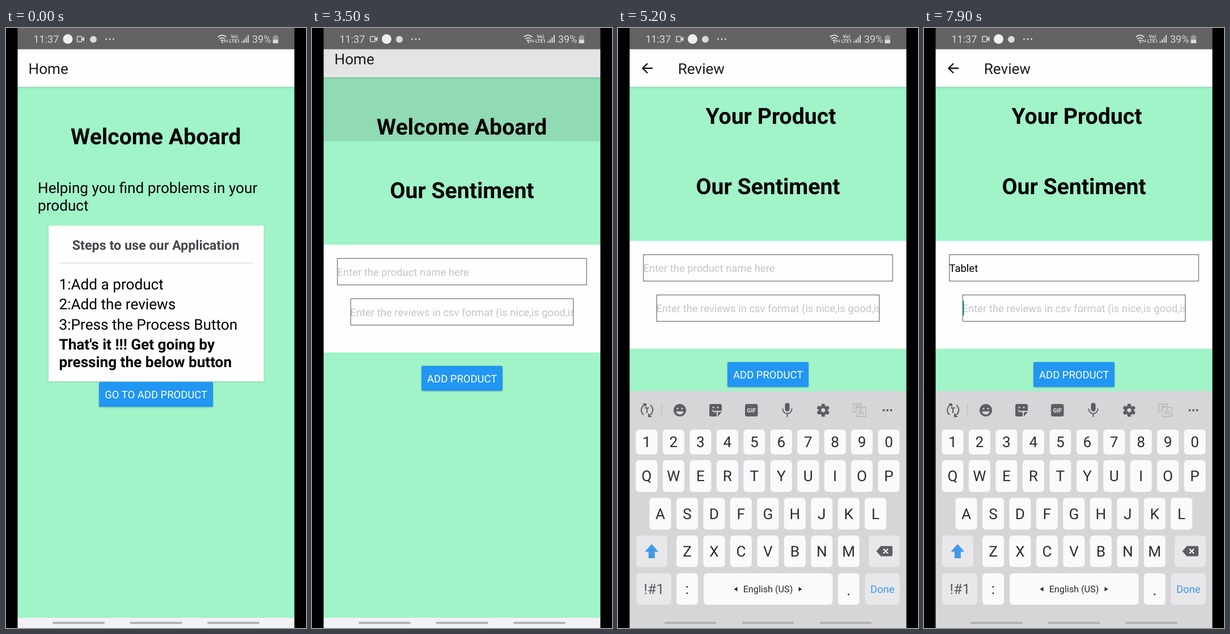
An HTML page that plays this animation: 529x1058 px, repeating every 8 s.

```html
<!DOCTYPE html>
<html lang="en">
<head>
<meta charset="utf-8">
<title>Review app</title>
<style>
  html, body { margin: 0; width: 100%; height: 100%; overflow: hidden; background: #000; }
  svg { display: block; width: 529px; height: 1058px; }
  text { font: 26.15px Roboto, sans-serif; text-rendering: geometricPrecision; white-space: pre; }
  .b { font-weight: 700; }
  .h { font-size: 39.2px; font-weight: 700; }
  .s { font-size: 18.45px; }
  .m { text-anchor: middle; }
  .hint { fill: #c5c5c7; }
  .btn { fill: #2196f3; filter: drop-shadow(0 1.5px 1.5px rgba(0,0,0,.25)); }
  .field { fill: none; stroke: #77777b; stroke-width: 1.3; }
  .key { fill: #faf9fc; }
  .fn { fill: #e8e7ea; }
  .ic { fill: #5e5d61; }
  .ln { fill: none; stroke: #5e5d61; stroke-width: 2; }
  #keyboard text { fill: #2c2c2f; }
</style>
</head>
<body>
<svg viewBox="0 0 529 1058">
  <defs>
    <linearGradient id="shade" x2="0" y2="1">
      <stop stop-opacity=".12"/><stop offset="1" stop-opacity="0"/>
    </linearGradient>
    <clipPath id="screen"><rect x="20" y="37" width="489" height="1003"/></clipPath>
    <clipPath id="reveal"><rect id="revealBox" x="20" y="37" width="489" height="1003"/></clipPath>
    <clipPath id="inner"><rect x="68" y="470" width="393" height="48"/></clipPath>
    <g id="page">
      <rect x="20" y="37" width="489" height="1050" fill="#a0f4c8"/>
      <rect x="20" y="37" width="489" height="66.700" fill="#fefefe"/>
      <rect x="20" y="103.700" width="489" height="4" fill="url(#shade)"/>
    </g>
  </defs>

  <g clip-path="url(#screen)">
    <g id="home">
      <use href="#page"/>
      <text x="39.500" y="81" fill="#1c1c1e">Home</text>
      <text class="h m" x="264.200" y="205">Welcome Aboard</text>
      <text x="56" y="291">Helping you find problems in your</text>
      <text x="56" y="322">product</text>
      <rect x="75" y="348.500" width="379.500" height="274.500" fill="#fefefe" stroke="#dbe5e2" style="filter:drop-shadow(0 1px 1px rgba(0,0,0,.15))"/>
      <text class="b m" x="264.200" y="391" fill="#43484d" style="font-size:23.300px">Steps to use our Application</text>
      <path d="M93.500 414.500H436" stroke="#d9dce0" stroke-width="1.3"/>
      <text x="93.500" y="461">1:Add a product</text>
      <text x="93.500" y="496.300">2:Add the reviews</text>
      <text x="93.500" y="531.600">3:Press the Process Button</text>
      <text class="b" x="93.500" y="567">That's it !!! Get going by</text>
      <text class="b" x="93.500" y="597.700">pressing the below button</text>
      <rect class="btn" x="164" y="624" width="201" height="44" rx="2.6"/>
      <text class="s m" x="264.700" y="653" fill="#fff">GO TO ADD PRODUCT</text>
    </g>
    <rect id="dim" x="20" y="37" width="489" height="1003"/>
  </g>

  <g clip-path="url(#reveal)">
    <g id="review">
      <use href="#page"/>
      <path d="M61 71H44M52 62.500L43.500 71L52 79.500" fill="none" stroke="#161618" stroke-width="2.4"/>
      <text x="105.700" y="81" fill="#1c1c1e">Review</text>
      <text class="h m" x="269.500" y="169">Your Product</text>
      <text class="h m" x="264.500" y="293">Our Sentiment</text>
      <rect x="20" y="375.500" width="489" height="190" fill="#fefefe"/>
      <text id="name" class="s" x="44.500" y="430"></text>
      <path id="underline" stroke="#000" stroke-width="1.2"/>
      <rect class="field" x="44.700" y="399.700" width="439.600" height="46.600"/>
      <g clip-path="url(#inner)"><text class="s hint" x="67.500" y="501">Enter the reviews in csv format (is nice,is good,is bad)</text></g>
      <rect class="field" x="68.300" y="470.700" width="392.400" height="46.600"/>
      <rect id="cursor" width="2.400" height="26" fill="#0a8f7c"/>
      <rect class="btn" x="193" y="589" width="143" height="44" rx="2.6"/>
      <text class="s m" x="264.700" y="618" fill="#fff">ADD PRODUCT</text>
    </g>
  </g>

  <rect x="20" y="1040" width="489" height="18" fill="#f2f1f3"/>

  <g id="keyboard">
    <rect x="20" y="640.500" width="489" height="420" fill="#d6d5d8"/>
    <!-- toolbar -->
    <path class="ln" d="M45 682a10.500 10.500 0 0 1 3-18M57 665a10.500 10.500 0 0 1-2 18M44 663h5v5M59 685h-5v-5"/>
    <text class="b m" x="51" y="679" style="font-size:14px;fill:#5e5d61">T</text>
    <path d="M77 662v24" stroke="#bcbbbe" stroke-width="1.3"/>
    <circle class="ic" cx="109" cy="674" r="11"/>
    <g fill="#d6d5d8"><circle cx="105" cy="671" r="1.600"/><circle cx="113" cy="671" r="1.600"/><path d="M102.500 676h13a6.500 5.500 0 0 1-13 0z"/></g>
    <path class="ic" d="M164 663h16q3 0 3 3v9h-6q-3 0-3 3v7h-10q-3 0-3-3v-16q0-3 3-3zM176 685v-5q0-3 3-3h4z"/>
    <g fill="#d6d5d8"><circle cx="168" cy="669" r="1.500"/><circle cx="176" cy="669" r="1.500"/></g>
    <path d="M166 674q5 5 9 1" fill="none" stroke="#d6d5d8" stroke-width="2"/>
    <rect class="ic" x="224" y="663" width="22.500" height="22" rx="3.500"/>
    <text class="b m" x="235.300" y="678" style="font-size:10.500px;fill:#e4e3e6">GIF</text>
    <rect class="ic" x="294.500" y="661" width="8" height="15" rx="4"/>
    <path class="ln" d="M290.500 671v1a8 8 0 0 0 16 0v-1M298.500 680v6"/>
    <g id="gear" class="ic"></g>
    <g fill="none" stroke="#bdbcbf" stroke-width="1.800">
      <path d="M419 677h-5v-14h15v5M417 667h9M421.500 665v2q0 4-4 6M420 681v4h17v-16h-17v9"/>
      <path d="M424 682l4.500-11l4.500 11M425.500 678.500h6"/>
    </g>
    <g class="ic"><circle cx="468.500" cy="674" r="2"/><circle cx="475" cy="674" r="2"/><circle cx="481.500" cy="674" r="2"/></g>
    <!-- keys -->
    <g id="keys"></g>
    <rect class="fn" x="32" y="895" width="55" height="55.500" rx="6"/>
    <path id="shift" d="M59.300 910l12 13.500h-6.500v11.500h-11v-11.500h-6.500z"/>
    <rect class="fn" x="442" y="895" width="55" height="55.500" rx="6"/>
    <path class="ic" d="M455.500 922.500l8-9h18q2.500 0 2.500 2.500v13q0 2.500-2.500 2.500h-18z"/>
    <path d="M468 918.500l8 8m0-8l-8 8" stroke="#fff" stroke-width="2"/>
    <rect class="fn" x="32" y="961.500" width="62" height="55.500" rx="6"/>
    <text class="m" x="63.500" y="998" style="font-size:25px;fill:#59585c">!#1</text>
    <rect class="key" x="151" y="961.500" width="227.500" height="55.500" rx="6"/>
    <text class="m" x="264.500" y="995" style="font-size:16.200px">English (US)</text>
    <path d="M210.500 985.500v8l-6-4zM318.500 985.500v8l6-4z" fill="#2c2c2f"/>
    <rect class="fn" x="435.500" y="961.500" width="61.500" height="55.500" rx="6"/>
    <text class="s m" x="466.300" y="996" style="fill:#3d9ae8">Done</text>
  </g>

  <g fill="#b4b3b6">
    <rect x="82" y="1047" width="92" height="4" rx="2"/><rect x="218.500" y="1047" width="92" height="4" rx="2"/><rect x="355" y="1047" width="92" height="4" rx="2"/>
  </g>

  <!-- status bar -->
  <rect width="529" height="37.500" fill="#656266"/>
  <g fill="#d9d8da">
    <text x="48.500" y="26" style="font-size:18px">11:37</text>
    <g id="camera"><rect x="-5.500" y="14.800" width="8" height="9.400" rx="1" fill="none" stroke="#d9d8da" stroke-width="1.600"/><path d="M3 18.500l4-3.500v9l-4-3.500z"/></g>
    <circle id="dot" cy="19.500" r="8.500" fill="#efeff0"/>
    <circle cx="154" cy="20" r="6"/>
    <circle cx="176.500" cy="19.500" r="1.500"/><circle cx="183" cy="19.500" r="1.500"/><circle cx="189.500" cy="19.500" r="1.500"/>
    <path d="M373.500 16q7.500-6.500 15 0M376 19.500q5-4.500 10 0M378.500 22.500q2.500-2 5 0" fill="none" stroke="#d9d8da" stroke-width="1.700"/>
    <path d="M381 23.500l2 2l-2 1zM386 26v-5m-1.500 2l1.500-2l1.500 2M390 20v5m-1.500-2l1.500 2l1.500-2" stroke="#d9d8da"/>
    <text class="b m" x="403" y="18" style="font-size:8.500px">Vo)</text>
    <text class="b m" x="403" y="26" style="font-size:8.500px">LTE1</text>
    <path d="M415.500 23h2v3h-2zM419 20h2v6h-2zM422.500 16.500h2v9.500h-2zM426 12.500h2v13.500h-2z"/>
    <text x="434" y="26" style="font-size:18px">39%</text>
    <path d="M473 12.500h4.500v1.500h2.500v6.500h-9.500v-6.500h2.500z" fill="#98969a"/>
    <path d="M470.500 20.500h9.500v6.500h-9.500z"/>
  </g>
  <path d="M0 0h20.500v1058h-20.500zM508.500 0h20.500v1058h-20.500z"/>
</svg>

<script>
const $ = id => document.getElementById(id);
const set = (id, attrs) => { for (const k in attrs) $(id).setAttribute(k, attrs[k]); };
const clamp = x => Math.min(1, Math.max(0, x));
const LOOP = 8000, STEP = 100, TOP = 37, HEIGHT = 1003;

// Keyboard rows: characters, first centre, top, height, baseline
const PITCH = 47.45;
const rows = [
  ["1234567890", 50.5, 708, 44, 739],
  ["qwertyuiop", 50.5, 762, 56, 799],
  ["asdfghjkl", 74.5, 828.5, 56, 865.5],
  ["zxcvbnm", 122, 895, 55.5, 932],
  [":", 122, 961.5, 55.5, 998],
  [".", 406.7, 961.5, 55.5, 1000]
];
$("keys").innerHTML = rows.map(([chars, x0, y, h, base]) =>
  [...chars].map((c, i) => {
    const x = x0 + i * PITCH;
    return `<rect class="key" x="${x - 19}" y="${y}" width="38" height="${h}" rx="6"/>
      <text class="m" x="${x}" y="${base}">${c}</text>`;
  }).join("")).join("");
const letters = [...$("keys").querySelectorAll("text")].filter(e => /[a-z]/.test(e.textContent));

$("gear").innerHTML = [0, 60, 120].map(a =>
  `<rect x="358.800" y="662.500" width="6" height="23" rx="1.500" transform="rotate(${a} 361.800 674)"/>`
).join("") + '<circle cx="361.800" cy="674" r="8.600"/><circle cx="361.800" cy="674" r="3.600" fill="#d6d5d8"/>';

// Cubic bezier easing, solved by bisection
function bezier(x1, y1, x2, y2) {
  const at = (s, a, b) => 3 * (1 - s) ** 2 * s * a + 3 * (1 - s) * s * s * b + s ** 3;
  return x => {
    let lo = 0, hi = 1;
    for (let i = 0; i < 30; i++) {
      const mid = (lo + hi) / 2;
      if (at(mid, x1, x2) < x) lo = mid; else hi = mid;
    }
    return at(lo, y1, y2);
  };
}
const revealEase = bezier(0.20833, 0.82, 0.25, 1);
const typed = [5600, 6000, 6200, 6400, 6600, 6800];

function render(t) {
  const swap = clamp((t - 200) / 300);
  set("dot", { cx: 109 + 22.5 * swap });
  set("camera", { transform: `translate(${131 - 22.5 * swap})` });

  const p = t < 3400 ? 0 : revealEase(clamp((t - 3361.3) / 425));
  const rest = HEIGHT * (1 - p);
  set("home", { transform: `translate(0 ${-0.02 * HEIGHT * p})` });
  set("dim", { opacity: 0.1 * clamp(p / 0.36) });
  set("revealBox", { y: TOP + rest, height: HEIGHT - rest });
  set("review", { transform: `translate(0 ${0.041 * rest})` });

  const up = 1 - (1 - clamp((t - 4750) / 400)) ** 3;
  set("keyboard", { transform: `translate(0 ${418 * (1 - up)})`, visibility: t < 4800 ? "hidden" : "visible" });

  const count = typed.filter(k => t >= k).length;
  const second = t >= 7500;
  $("name").textContent = count ? "Tablet".slice(0, count) : "Enter the product name here";
  $("name").classList.toggle("hint", !count);
  const end = 44.5 + (count ? $("name").getComputedTextLength() : 0);
  set("underline", { d: count && !second ? `M44.500 432.500H${end}` : "" });

  const shown = (t >= 4500 && t < 5100) || t >= 5600;
  set("cursor", { x: second ? 68 : end - 0.5, y: second ? 481 : 410, visibility: shown ? "visible" : "hidden" });

  const lower = t >= 5700 && t < 7600;
  for (const e of letters) e.textContent = lower ? e.textContent.toLowerCase() : e.textContent.toUpperCase();
  set("shift", { fill: lower ? "#5e5d61" : "#4199e6" });
}

const start = performance.now();
function tick() {
  const t = (performance.now() - start) % LOOP;
  render(Math.floor(t / STEP) * STEP);
  requestAnimationFrame(tick);
}
tick();
</script>
</body>
</html>
```
